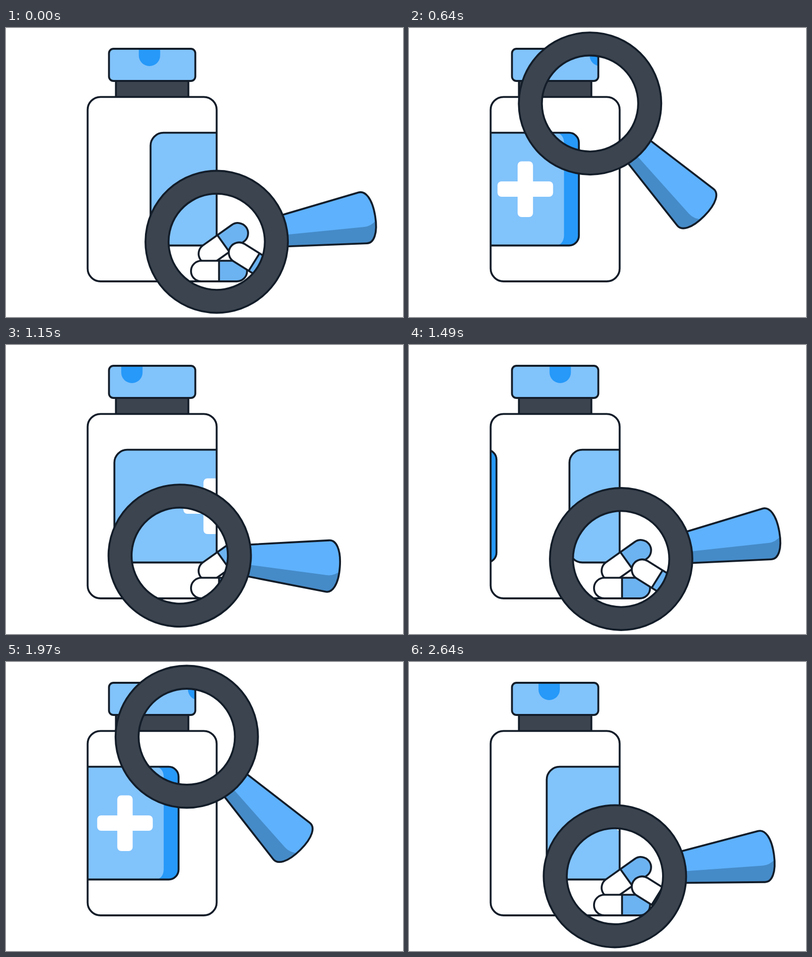
An HTML page that plays this animation: 800x584 px, repeating every 2.67 s.

```html
<!DOCTYPE html>
<html lang="en">
<head>
<meta charset="utf-8">
<title>Pill bottle and magnifier</title>
<style>
  html, body { margin: 0; width: 100%; height: 100%; overflow: hidden; background: #fff; }
  svg { display: block; width: 800px; height: 584px; }
  .line { stroke: #131d29; stroke-width: 3.8; stroke-linejoin: round; }
  .none { fill: none; }
  .white { fill: #fff; }
  .sky { fill: #81c3fb; }
  .blue { fill: #2699f9; }
  .dark { fill: #3b444f; }
  .pill { fill: #6cb3f1; }
  .grip { fill: #5eb1fc; }
  .shade { fill: #458bc8; }
</style>
</head>
<body>
<svg viewBox="0 0 800 584">
  <defs>
    <rect id="body" x="164.5" y="139.3" width="260" height="372.7" rx="26"/>
    <rect id="cap" x="207.5" y="42" width="174" height="65" rx="9"/>
    <path id="grip" d="M130-31L298-52C312-54 323.5-36 323.5 0S312 54 298 52L130 31Z"/>
    <clipPath id="inBody"><use href="#body"/></clipPath>
    <clipPath id="inCap"><use href="#cap"/></clipPath>
    <clipPath id="inGrip"><use href="#grip"/></clipPath>
    <clipPath id="inLens"><circle id="lens" r="97"/></clipPath>

    <g id="label">
      <path class="blue" d="M200 211.7H283a20 20 0 0 1 20 20V419.5a20 20 0 0 1-20 20H200Z"/>
      <path class="sky" d="M26 211.7H257a16 20 0 0 1 16 20V419.5a16 20 0 0 1-16 20H26a26 26 0 0 1-26-26V237.7a26 26 0 0 1 26-26Z"/>
      <path class="line none" d="M26 211.7H283a20 20 0 0 1 20 20V419.5a20 20 0 0 1-20 20H26a26 26 0 0 1-26-26V237.7a26 26 0 0 1 26-26Z"/>
      <rect class="white" x="179.5" y="269.5" width="31" height="112.5" rx="8"/>
      <rect class="white" x="139" y="310" width="112" height="31" rx="8"/>
    </g>
    <path id="notch" class="blue" d="M-21.5 40V55.5a21.5 21.5 0 0 0 43 0V40Z"/>
    <g id="capsule">
      <rect class="white" x="-56.5" y="-20.8" width="113" height="41.6" rx="20.8"/>
      <path class="pill" d="M0-20.8H35.7a20.8 20.8 0 0 1 0 41.6H0Z"/>
      <rect class="line none" x="-56.5" y="-20.8" width="113" height="41.6" rx="20.8"/>
      <path class="line" d="M0-20.8V20.8"/>
    </g>
  </defs>

  <rect class="line dark" x="221.5" y="107" width="146" height="33"/>
  <use href="#cap" class="sky"/>
  <g clip-path="url(#inCap)"><g id="notches">
    <use href="#notch"/><use href="#notch" x="-219"/>
  </g></g>
  <use href="#cap" class="line none"/>

  <use href="#body" class="white"/>
  <g clip-path="url(#inBody)"><g id="labels">
    <use href="#label"/><use href="#label" x="-450"/>
  </g></g>
  <use href="#body" class="line none"/>

  <g clip-path="url(#inLens)">
    <use href="#capsule" transform="translate(438 435.5) rotate(-35.5)"/>
    <use href="#capsule" transform="translate(429.3 491.2)"/>
    <use href="#capsule" transform="translate(500 473) rotate(32)"/>
  </g>

  <g id="glass">
    <use href="#grip" class="grip"/>
    <path class="shade" clip-path="url(#inGrip)" d="M130 8L298 18.5Q313 19.5 325 8V60H130Z"/>
    <use href="#grip" class="line none"/>
    <path class="line dark" fill-rule="evenodd"
      d="M-143.5 0a143.5 143.5 0 1 1 287 0a143.5 143.5 0 1 1-287 0ZM-97 0a97 97 0 1 0 194 0a97 97 0 1 0-194 0Z"/>
  </g>
</svg>
<script>
  const LOOP = 2670;
  const $ = id => document.getElementById(id);

  // time in ms -> turns of the bottle
  const pace = [[0, 0], [640, .44], [1150, .838], [1490, 1.071], [1970, 1.452], [2240, 1.66], [2640, 1.969], [LOOP, 2]];

  // turn, lens x, lens y, handle angle
  const path = [
    [0, 424.5, 432, -9.3],
    [.04, 428.5, 432.3, -10],
    [.071, 427.5, 432.5, -9.8],
    [.12, 426, 428, -8.9],
    [.214, 411, 360, 4.4],
    [.28, 394, 283, 19.2],
    [.37, 373, 188, 38],
    [.446, 364.5, 151.7, 44.8],
    [.46, 364, 150.7, 45],
    [.66, 342, 295.5, 23.3],
    [.79, 347, 418.5, 8],
    [.838, 350, 425.5, 4.1],
    [.9, 378, 434.6, -1.6],
    [.969, 414.5, 433, -7.6]
  ];

  function turnsAt(t) {
    const i = pace.findIndex(k => k[0] > t);
    const [t0, p0] = pace[i - 1], [t1, p1] = pace[i];
    return p0 + (p1 - p0) * (t - t0) / (t1 - t0);
  }

  // key by index, wrapping around the cycle
  function key(i, c) {
    const n = path.length, lap = Math.floor(i / n), k = path[i - lap * n];
    return c ? k[c] : k[0] + lap;
  }
  const slope = (i, c) => (key(i + 1, c) - key(i, c)) / (key(i + 1, 0) - key(i, 0));

  // harmonic mean keeps the curve from overshooting its keys
  function tangent(i, c) {
    const a = slope(i - 1, c), b = slope(i, c);
    return a * b > 0 ? 2 * a * b / (a + b) : 0;
  }

  function sample(p, c) {
    let i = path.length - 1;
    while (path[i][0] > p) i--;
    const h = key(i + 1, 0) - key(i, 0), u = (p - key(i, 0)) / h, v = 1 - u;
    return key(i, c) * v * v * (1 + 2 * u) + key(i + 1, c) * u * u * (3 - 2 * u)
      + h * u * v * (tangent(i, c) * v - tangent(i + 1, c) * u);
  }

  function draw(now) {
    const p = turnsAt(now % LOOP) % 1;
    const [x, y, a] = [1, 2, 3].map(c => sample(p, c));
    $('labels').setAttribute('transform', `translate(${291 + 450 * p})`);
    $('notches').setAttribute('transform', `translate(${289 + 219 * p})`);
    $('glass').setAttribute('transform', `translate(${x} ${y}) rotate(${a})`);
    $('lens').setAttribute('cx', x);
    $('lens').setAttribute('cy', y);
  }

  function tick() {
    draw(performance.now());
    requestAnimationFrame(tick);
  }
  tick();
</script>
</body>
</html>
```
